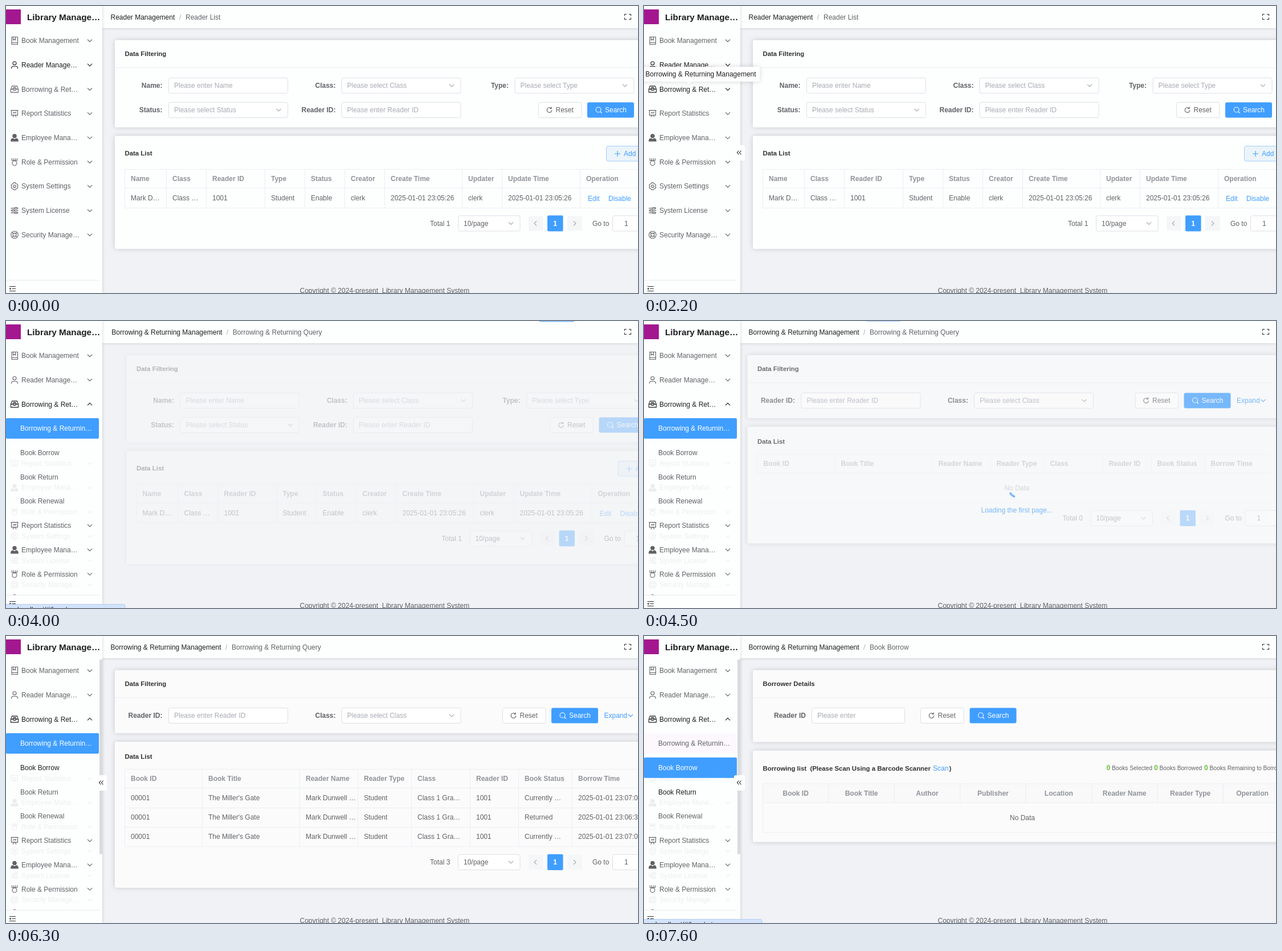
An HTML page that plays this animation: 1109 px wide and 505 px high, repeating every 8000 ms.

```html
<!DOCTYPE html>
<html lang="en">
<head>
<meta charset="utf-8">
<title>Library management</title>
<style>
html, body { margin: 0; width: 100%; height: 100%; overflow: hidden; background: #f0f2f5; }
svg { display: block; width: 1109px; height: 505px; font: 12px "Liberation Sans", Arial, sans-serif; }
text { fill: #606266; white-space: pre; }
path { fill: none; stroke: #606266; stroke-width: 1.1; }
.bold, .head, .title { font-weight: bold; }
.head { fill: #909399; }
.title { fill: #303133; font-size: 11.4px; }
.hint { fill: #a8abb2; }
.dark { fill: #1d1e20; }
.blue { fill: #409eff; }
.white { fill: #fff; }
.mid { text-anchor: middle; }
.end { text-anchor: end; }
.card { filter: drop-shadow(0 0 4px rgba(0, 0, 0, .17)); }
.tip { filter: drop-shadow(0 0 4px rgba(0, 0, 0, .15)); }
</style>
</head>
<body>
<svg id="stage" viewBox="0 0 1109 505"></svg>
<script>
const LOOP = 8000, STEP = 100, PITCH = 42.7;
const BLUE = '#409eff', GREY = '#606266', PALE = '#a8abb2', DARK = '#1d1e20', LINE = '#ebeef5', EDGE = '#dcdfe6';
const stage = document.getElementById('stage');

const clamp = u => Math.max(0, Math.min(1, u));
const mix = (a, b, u) => a + (b - a) * u;
const bezier = (x1, y1, x2, y2) => u => {
  const at = (a, b, s) => 3 * a * s * (1 - s) ** 2 + 3 * b * s * s * (1 - s) + s ** 3;
  let lo = 0, hi = 1;
  for (let i = 0; i < 24; i++) {
    const s = (lo + hi) / 2;
    if (at(x1, x2, s) < u) lo = s; else hi = s;
  }
  return at(y1, y2, lo);
};
const ease = bezier(.25, .1, .25, 1), easeInOut = bezier(.42, 0, .58, 1);
const progress = (t, start, len = 500) => ease(clamp((t - start) / len));

// Drawing helpers; text is placed by the middle of its capitals.
const text = (x, y, s, cls = '') => `<text x="${x}" y="${y + 4.2}" class="${cls}">${s}</text>`;
const rect = (x, y, w, h, fill, more = '') => `<rect x="${x}" y="${y}" width="${w}" height="${h}" fill="${fill}" ${more}/>`;
const path = (d, color = GREY, more = '') => `<path d="${d}" style="stroke:${color}" ${more}/>`;
const group = (x, y, body, opacity = 1) => `<g transform="translate(${x} ${y})" opacity="${opacity}">${body}</g>`;
const box = (x, y, w, h, fill = '#fff', edge = EDGE) => rect(x, y, w, h, fill, `rx="3" stroke="${edge}"`);
const chevron = (x, y, color = PALE, up = 1) => path(`M${x - 4} ${y - 2 * up}l4 ${4 * up} 4 ${-4 * up}`, color);
const side = (x, y, dir) => path(`M${x - 2 * dir} ${y - 4}l${4 * dir} 4 ${-4 * dir} 4`, PALE);

function field(x, y, hint, select, w = 209) {
  return box(x, y - 13.5, w, 27) + text(x + 9.5, y, hint, 'hint') + (select ? chevron(x + w - 16, y) : '');
}
function buttons(resetX, searchX, y) {
  const r = resetX + 19, s = searchX + 20;
  return box(resetX, y - 13.5, 75.5, 27) +
    path(`M${r + 3} ${y - 3}a4.3 4.3 0 1 0 1.3 3M${r + 3.6} ${y - 5.5}v3h-3`) + text(resetX + 30, y, 'Reset') +
    rect(searchX, y - 13.5, 82, 27, BLUE, 'rx="3"') +
    path(`M${s - 5} ${y - .5}a4.5 4.5 0 1 0 9 0a4.5 4.5 0 1 0-9 0M${s + 3} ${y + 3}l2.5 2.5`, '#fff') +
    text(searchX + 31, y, 'Search', 'white');
}
const card = (y, h, fill) => rect(191, y, 940, h, fill, 'rx="3" class="card"');
const filterCard = (h, title, fill) => card(60, h, fill) + text(208.5, 84, title, 'title') + rect(191, 108, 918, 1, LINE);

// Cell borders: xs are the column edges, ys the row edges.
const grid = (xs, ys) =>
  path(ys.map(y => `M208 ${y}H1109`).join('') + xs.map(x => `M${x} ${ys[0]}V${ys[1]}`).join(''), LINE);
const columns = (xs, ys) => path(xs.map(x => `M${x} ${ys[0]}V${ys.at(-1)}`).join(''), LINE);
const row = (xs, y, cells, cls) => cells.map((s, i) => text(xs[i] + 10.5, y, s, cls)).join('');

function pager(y, total) {
  return text(744, y, 'Total ' + total) + box(793.5, y - 13.5, 108.5, 27) + text(803, y, '10/page') + chevron(886, y) +
    rect(917, y - 13, 25.5, 26, '#f5f6f8', 'rx="2"') + side(929, y, -1) +
    rect(950, y - 14, 27.5, 28, BLUE, 'rx="2"') + text(963.7, y, 1, 'white bold mid') +
    rect(985, y - 13, 26, 26, '#f5f6f8', 'rx="2"') + side(998, y, 1) +
    text(1029, y, 'Go to') + box(1064.5, y - 13.5, 70, 27) + text(1085, y, 1);
}

function readerPage() {
  const xs = [208.5, 281.5, 351.5, 454.5, 524.5, 594.5, 664.5, 800.5, 870.5, 1007.5], ys = [287.5, 320.5, 355.5];
  const fill = '#fdfefe';
  return filterCard(153.5, 'Data Filtering', fill) +
    text(274.5, 140, 'Name:', 'bold end') + field(285.5, 140, 'Please enter Name') +
    text(578.5, 140, 'Class:', 'bold end') + field(589, 140, 'Please select Class', 1) +
    text(882, 140, 'Type:', 'bold end') + field(893, 140, 'Please select Type', 1) +
    text(274.5, 183, 'Status:', 'bold end') + field(285.5, 183, 'Please select Status', 1) +
    text(578.5, 183, 'Reader ID:', 'bold end') + field(589, 183, 'Please enter Reader ID') +
    buttons(934.5, 1020, 183) +
    card(228.5, 199, fill) + text(208.5, 259, 'Data List', 'title') +
    box(1053.5, 246.5, 80, 26.5, '#ebf4f9', '#a0cfff') + path('M1068 260h10M1073 255v10', BLUE) + text(1084, 260, 'Add', 'blue') +
    grid([], ys) + columns(xs, ys) +
    row(xs, 303.5, ['Name', 'Class', 'Reader ID', 'Type', 'Status', 'Creator', 'Create Time', 'Updater', 'Update Time', 'Operation'], 'head') +
    row(xs, 338, ['Mark D…', 'Class …', '1001', 'Student', 'Enable', 'clerk', '2025-01-01 23:05:26', 'clerk', '2025-01-01 23:05:26']) +
    text(1021, 338.5, 'Edit', 'blue') + text(1057, 338.5, 'Disable', 'blue') +
    pager(382.5, 1);
}

function spinner(ms) {
  const phase = ms % 1500 / 1500, late = phase >= .5;
  const u = easeInOut(phase * 2 % 1);
  const dash = late ? '90 150' : `${mix(1, 90, u)} ${mix(200, 150, u)}`;
  const shift = late ? mix(-40, -120, u) : mix(0, -40, u);
  return `<g transform="translate(663.5 297) scale(.84) rotate(${ms * .18}) translate(-15 -15)">` +
    path('M30 15L28 17M25.61 25.61A15 15 0 0 1 15 30A15 15 0 1 1 27.99 7.5L15 15', BLUE,
      `stroke-dasharray="${dash}" stroke-dashoffset="${shift}" style="stroke:${BLUE};stroke-width:4"`).replace(/ style="stroke:#409eff"/, '') + '</g>';
}

function queryPage(t) {
  const xs = [208.5, 344.5, 515.5, 617.5, 711.5, 814.5, 899.5, 993.5], loaded = t >= 5300;
  const ys = loaded ? [234.5, 267.5, 302.5, 336.5, 370.5] : [234.5, 267.5, 319.5];
  const fill = '#fbfbfb', mask = 1 - clamp((t - 5300) / 300);
  const loan = (y, state, time) => row(xs, y,
    ['00001', "The Miller's Gate", 'Mark Dunwell …', 'Student', 'Class 1 Gra…', '1001', state, '2025-01-01 ' + time]);
  return filterCard(111, 'Data Filtering', fill) +
    text(274.5, 140, 'Reader ID:', 'bold end') + field(285.5, 140, 'Please enter Reader ID') +
    text(578.5, 140, 'Class:', 'bold end') + field(589, 140, 'Please select Class', 1) +
    buttons(871.5, 957, 140) + text(1049.5, 140, 'Expand', 'blue') + chevron(1096, 140, BLUE) +
    card(186, loaded ? 257 : 205.5, fill) + text(208.5, 211.5, 'Data List', 'title') +
    (loaded ? grid([], ys) + columns(xs, ys) : grid(xs, ys)) +
    row(xs, 250.5, ['Book ID', 'Book Title', 'Reader Name', 'Reader Type', 'Class', 'Reader ID', 'Book Status', 'Borrow Time'], 'head') +
    (loaded
      ? loan(285, 'Currently …', '23:07:08') + loan(319, 'Returned', '23:06:38') + loan(353, 'Currently …', '23:07:08')
      : text(664, 294, 'No Data', 'head mid" font-weight="400" style="font-weight:400')) +
    pager(loaded ? 398 : 347, loaded ? 3 : 0) +
    (mask > 0 ? group(0, 0, rect(208, 234, 901, loaded ? 190 : 141, '#fbfbfb', 'opacity=".52"') + spinner(t - 4300) +
      text(663.7, 332.5, 'Loading the first page...', 'blue mid'), mask) : '');
}

function borrowPage() {
  const xs = Array.from({ length: 8 }, (_, i) => 208.5 + 115.4 * i), fill = '#fbfbfb';
  const names = ['Book ID', 'Book Title', 'Author', 'Publisher', 'Location', 'Reader Name', 'Reader Type', 'Operation'];
  const count = (x, s) => `<text x="${x}" y="236.2" font-size="10.2"><tspan font-size="12" font-weight="bold" fill="#67c23a">0</tspan> ${s}</text>`;
  return filterCard(126.5, 'Borrower Details', fill) +
    text(284, 140, 'Reader ID', 'bold end') + field(294.5, 140, 'Please enter', 0, 163) + buttons(485.5, 571.5, 140) +
    card(201.5, 161, fill) +
    text(208.5, 232.5, 'Borrowing list  (Please Scan Using a Barcode Scanner', 'title') +
    text(507, 232.5, 'Scan', 'blue') + text(535.5, 232.5, ')', 'title') +
    count(811.5, 'Books Selected') + count(895, 'Books Borrowed') + count(983, 'Books Remaining to Borrow') +
    rect(208.5, 260, 901, 33.5, '#f9f9fa') + grid(xs, [260, 293.5, 345.5]) + path('M208.5 293V345', LINE) +
    names.map((s, i) => text(i < 7 ? xs[i] + 57.7 : 1067.5, 276.5, s, 'head mid')).join('') +
    text(664, 320, 'No Data', 'mid');
}

// Old page slides out to the right, then the new one comes in from the left.
function content(t) {
  const turn = (start, oldPage, newPage) => {
    const out = progress(t, start), into = progress(t, start + 500);
    return t < start + 500 ? group(30 * out, 0, oldPage(t), 1 - out) : group(30 * into - 30, 0, newPage(t), into);
  };
  return t < 6600 ? turn(3800, readerPage, queryPage) : turn(6600, queryPage, borrowPage);
}

function header(t) {
  const crumbs = (parent, page, width, dx, dx2) =>
    text(183.5 + dx, 20, parent, 'dark') + text(183.5 + width + dx, 20, '/', 'hint') + text(194.5 + width + dx2, 20, page);
  const loan = 'Borrowing &amp; Returning Management';
  const slide = start => 20 * (1 - progress(t, start));
  const bar = t >= 3900 && t < 4300 ? rect(936, 0, 61, 1.5, '#79bbff') : t >= 4400 && t < 5500 ? rect(390, 0, 60, 1, '#a0cfff') : '';
  return rect(169, 0, 940, 39, '#fdfefe', 'style="filter:drop-shadow(0 1px 2px rgba(0,0,0,.12))"') + bar +
    (t < 3700 ? crumbs('Reader Management', 'Reader List', 120.5, 0, 0)
      : t < 6600 ? crumbs(loan, 'Borrowing &amp; Returning Query', 201.5, slide(3680), slide(3680))
      : crumbs(loan, 'Book Borrow', 201.5, 0, slide(6550))) +
    path('M1089 14.5h-3.5v3M1093 14.5h3.5v3M1089 23.5h-3.5v-3M1093 23.5h3.5v-3', '#303133', 'stroke-width="1.3"');
}

const ring = r => `M${-r} 0a${r} ${r} 0 1 0 ${2 * r} 0a${r} ${r} 0 1 0 ${-2 * r} 0`;
const menu = [
  ['Book Management', 'M-5-6.5h10.5v13h-10.5zM-5 3.5h10.5M-2.5-6.5v5.5l2-1.5 2 1.5v-5.5'],
  ['Reader Manage…', 'M-3-3a3 3 0 1 0 6 0a3 3 0 1 0-6 0M-5.5 6.5v-1a3 3 0 0 1 3-3h5a3 3 0 0 1 3 3v1'],
  ['Borrowing &amp; Ret…', 'M-6.5 0l2-5.5h9l2 5.5v5.5h-13zh4l1 2h3l1-2h4M-2.5-3h5M-3.5-1h7'],
  ['Report Statistics', 'M-6.5-5.5h13M-5.5-5.5v8.5h11v-8.5M-3 6.5l2-3.5M3 6.5l-2-3.5M-3 0l2-2 2 1.5 2-2.5'],
  ['Employee Mana…', 'M-3-3a3 3 0 1 0 6 0a3 3 0 1 0-6 0M-6 6v-1.5a3.5 3.5 0 0 1 3.5-3l2.5 2 2.5-2a3.5 3.5 0 0 1 3.5 3v1.5z'],
  ['Role &amp; Permission', 'M-4.5-6.5v4h9v-4M-1.5-6.5v4M1.5-6.5v4M-4 2a4 4 0 1 0 8 0a4 4 0 1 0-8 0'],
  ['System Settings', 'M-1.5-6.3h3l.8 1.8 2 .2 1.6 2.4-1 1.9 1 1.9-1.6 2.4-2 .2-.8 1.8h-3l-.8-1.8-2-.2-1.6-2.4 1-1.9-1-1.9 1.6-2.4 2-.2z' + ring(2.2)],
  ['System License', 'M-6.5-4h7m4 0h2M-6.5 0h2m4 0h7M-6.5 4h7m4 0h2M.5-5.3h4v2.6h-4zM-4.5-1.3h4v2.6h-4zM.5 2.7h4v2.6h-4z'],
  ['Security Manage…', ring(6.3) + ring(3) + 'M-4.5-4.5l2.4 2.4M4.5-4.5l-2.4 2.4M-4.5 4.5l2.4-2.4M4.5 4.5l-2.4-2.4']
];
const submenu = ['Borrowing &amp; Returnin…', 'Book Borrow', 'Book Return', 'Book Renewal'];

function menuItem(i, y, dark, open) {
  const [name, icon] = menu[i], color = dark ? DARK : GREY;
  return group(15, y, path(icon, color, i === 4 ? `fill="${color}" style="fill:${color}"`.replace('style', 'data-s') : '') +
    (i === 4 ? `<g fill="${color}"><circle cy="-3" r="3"/><path d="${icon}" style="fill:${color}"/></g>` : '')) +
    text(27, y, name, dark ? 'dark' : '') + chevron(147, y, color, open ? -1 : 1);
}

function sidebar(t) {
  const open = t < 3000 ? 0 : t < 3100 ? .36 : t < 3200 ? .85 : 1, drop = 4 * PITCH * open;
  const active = t < 3700 ? -1 : t < 6600 ? 0 : 1;
  const hover = t < 3200 ? -1 : t < 3700 ? 0 : t >= 6100 && t < 6600 ? 1 : t >= 7000 ? 2 : -1;
  let items = '', ghosts = '', subs = '';
  menu.forEach((_, i) => {
    const y = 61 + PITCH * i;
    const dark = i === 1 && t < 3700 || i === 2 && t >= 1300 && (t < 3200 || t >= 3700);
    items += menuItem(i, i > 2 ? y + drop : y, dark, i === 2 && open);
    if (i > 2 && t >= 3100) ghosts += menuItem(i, y + 61.4);
  });
  submenu.forEach((name, i) => {
    const y = 189 + PITCH * i;
    if (i === 0 && active === 1) subs += rect(0, 171, 163, 36, '#fdf8fe');
    if (i === active) subs += rect(0, y - 18, 163, 36, BLUE, 'rx="2"');
    subs += text(25, y, name, i === active ? 'white' : i === hover ? 'dark' : '');
  });
  const inside = t < 3800 || t >= 6000;
  return rect(-5, 0, 174, 505, '#fdfefe', 'style="filter:drop-shadow(1px 0 2px rgba(0,0,0,.12))"') +
    `<clipPath id="list"><rect y="40" width="169" height="442"/></clipPath><clipPath id="sub"><rect y="167" width="169" height="${drop}"/></clipPath>` +
    `<g clip-path="url(#list)">${group(0, 0, ghosts, .1)}${items}<g clip-path="url(#sub)">${subs}</g></g>` +
    rect(0, 6, 26, 26, '#a3178f') +
    `<text x="37" y="24.5" class="dark bold" font-size="15.3">Library Manage…</text>` +
    rect(0, 482, 163, 1, '#e8eaee') +
    path('M6 493.5h11M10.5 497.5h6.5M6 501.5h11', '#303133') + '<path d="M8.5 495.5v4l-3-2z" style="fill:#303133;stroke:none"/>' +
    (inside && t >= 3100 ? rect(164, 41, 5, 343, '#d9dbde', 'rx="2"') : '') +
    (inside && t >= 1300 ? rect(158, 245, 19, 27, '#fff', 'rx="3"') : '') +
    (inside && t >= 1000 ? path('M166.5 254.5l-3 3.5 3 3.5M170.5 254.5l-3 3.5 3 3.5', DARK) : '');
}

function tooltip(t) {
  const tip = (x, y, w, label, textX, arrowX, opacity) => group(0, 0,
    `<g class="tip">${rect(x, y, w, 26, '#fff', 'rx="3"')}<path d="M${arrowX - 5} ${y + 25.5}h10l-5 4.5z" style="fill:#fff;stroke:none"/></g>` +
    text(textX, y + 13, label, 'dark'), opacity);
  if (t >= 1300 && t < 3000) return tip(-10, 107, 213, 'Borrowing &amp; Returning Management', 2.5, 79, t < 1600 ? .8 : 1);
  if (t >= 3200 && t < 3800) return tip(-5, 149.5, 180, 'Borrowing &amp; Returning Query', 11, 90, Math.min(1, .3 + (t - 3200) / 220));
  return '';
}

function overlay(t) {
  const u = (t - 1600) / 600;
  const ripple = u > 0 && u < 1 ? `<circle cx="137" cy="130" r="${108 * u}" opacity="${.06 * (1 - u)}"/>` : '';
  const status = (w, s) => rect(-2, 498.5, w + 2, 12, '#d3e3fd', 'rx="3" stroke="#b5cdf5"') + text(20, 508, s, 'dark');
  return ripple + (t >= 3500 && t < 4500 ? status(209, 'localhost/#/loan/query') : t >= 6600 ? status(207, 'localhost/#/loan/return') : '');
}

let shown = -1;
function frame(now) {
  const t = Math.floor(now % LOOP / STEP) * STEP;
  if (t !== shown) {
    shown = t;
    stage.innerHTML = rect(0, 0, 1109, 505, '#f0f2f5') + content(t) +
      text(515.5, 500.5, 'Copyright © 2024-present  Library Management System') +
      header(t) + sidebar(t) + tooltip(t) + overlay(t);
  }
  requestAnimationFrame(frame);
}
requestAnimationFrame(frame);
</script>
</body>
</html>
```
